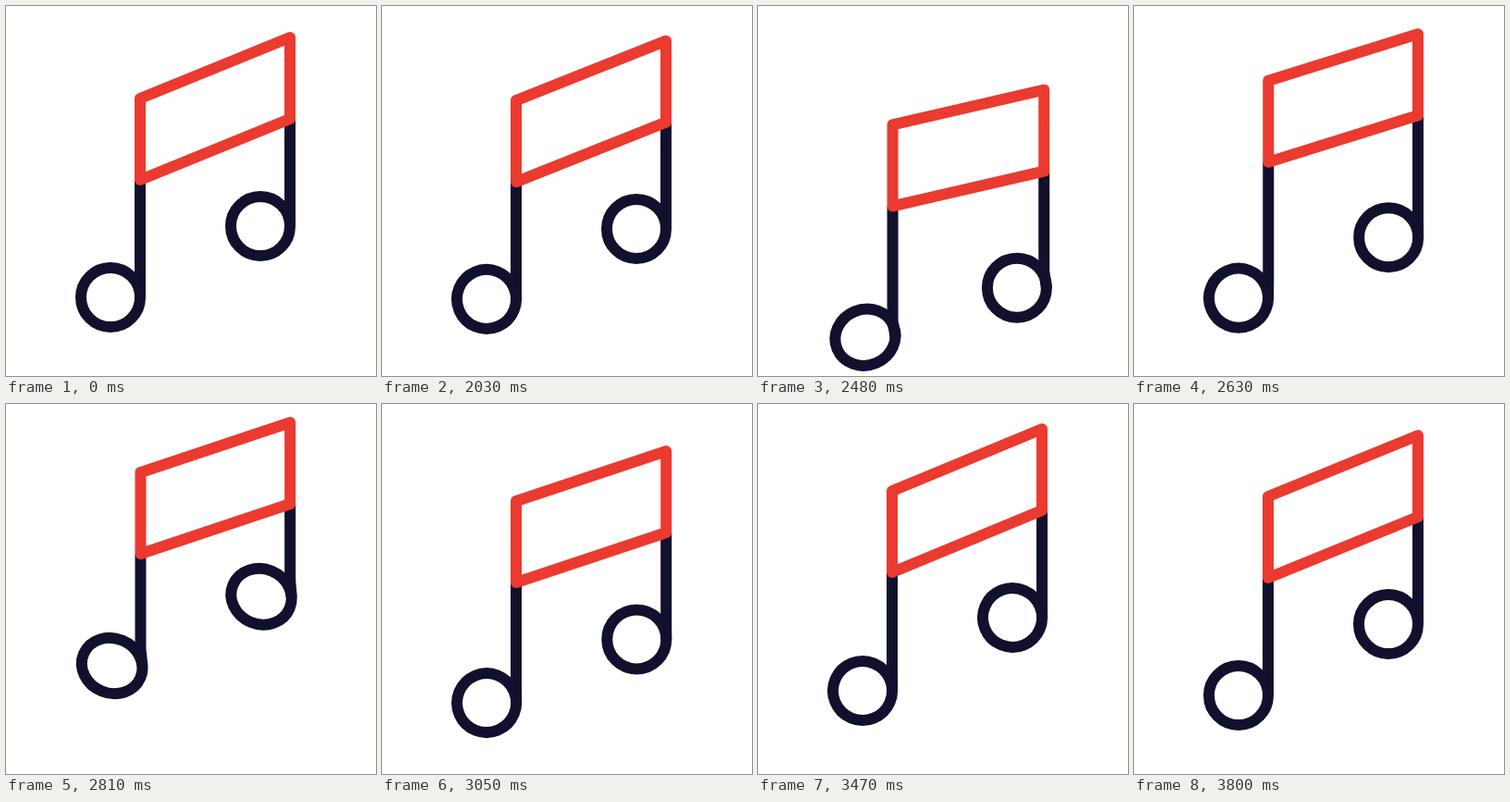
Animation of 400 by 400 pixels, one loop 3.83 s. Source, as an HTML page with a canvas:

```html
<!DOCTYPE html>
<html lang="en">
<head>
<meta charset="utf-8">
<title>Bouncing music note</title>
<style>
  html, body { margin: 0; width: 100%; height: 100%; overflow: hidden; background: #fff; }
  canvas { display: block; }
</style>
</head>
<body>
<canvas id="stage" width="400" height="400"></canvas>
<script>
const ctx = document.getElementById('stage').getContext('2d');
const LOOP = 3830, REST = 2000, STEP = 30;
const NAVY = '#11112e', RED = '#eb3a2f';
const RADIUS = 32, BAR = 88;

// The first swing takes DROP steps, each later one BEAT; heads trail the bar.
const DROP = 14, BEAT = 11;
const BAR_LAG = -1, HEAD_LAG = 1;

// swings: heights of successive turning points; sway: sideways drift.
const leftBar = { x: 145, y: 100, lag: BAR_LAG, swings: [42, -33, 5, -7.4], sway: 0.0007 };
const rightBar = { x: 307, y: 34, lag: BAR_LAG, swings: [74, -21, 17, -8.5], sway: 0.0007 };
const leftHead = { x: 113, y: 315, lag: HEAD_LAG, swings: [45, -33, 12, -5.1], sway: 0.0016, droop: 0.0008 };
const rightHead = { x: 275, y: 238, lag: HEAD_LAG, swings: [69, -31, 21, -7.2], sway: 0.0011, droop: 0 };

function swing(part, k) {
  const first = DROP + part.lag;
  const beat = k < first ? k / first : 1 + (k - first) / BEAT;
  const i = Math.floor(beat), u = beat - i;
  const from = part.swings[i - 1] || 0, to = part.swings[i] || 0;
  const kick = i === 0 ? 0.5 * u * (1 - u) ** 2 : 0;
  return from + (to - from) * (u * u * (3 - 2 * u) + kick);
}

function place(part, k) {
  const dy = swing(part, k);
  return {
    x: part.x + part.sway * dy * dy,
    y: part.y + dy,
    squash: dy * dy * (dy < 0 ? 0.002 : -part.droop)
  };
}

function drawNote(bar, head) {
  const amount = Math.abs(head.squash);
  ctx.beginPath();
  ctx.moveTo(bar.x, bar.y + BAR);
  ctx.lineTo(bar.x, head.y - 18);
  ctx.lineTo(head.x + RADIUS + amount * 0.4, head.y);
  ctx.stroke();
  ctx.beginPath();
  ctx.ellipse(head.x, head.y, RADIUS + 0.65 * amount, RADIUS - 1.2 * amount,
    Math.sign(head.squash) * 0.4, 0, Math.PI * 2);
  ctx.stroke();
}

function draw(now) {
  const k = Math.max(0, Math.floor((now % LOOP - REST) / STEP));
  const a = place(leftBar, k), b = place(rightBar, k);

  ctx.fillStyle = '#fff';
  ctx.fillRect(0, 0, 400, 400);
  ctx.lineWidth = 12;
  ctx.lineJoin = 'round';

  ctx.strokeStyle = NAVY;
  drawNote(a, place(leftHead, k));
  drawNote(b, place(rightHead, k));

  ctx.strokeStyle = RED;
  ctx.beginPath();
  ctx.moveTo(a.x, a.y);
  ctx.lineTo(b.x, b.y);
  ctx.lineTo(b.x, b.y + BAR);
  ctx.lineTo(a.x, a.y + BAR);
  ctx.closePath();
  ctx.stroke();
}

const start = performance.now();
function tick() {
  draw(performance.now() - start);
  requestAnimationFrame(tick);
}
tick();
</script>
</body>
</html>
```
